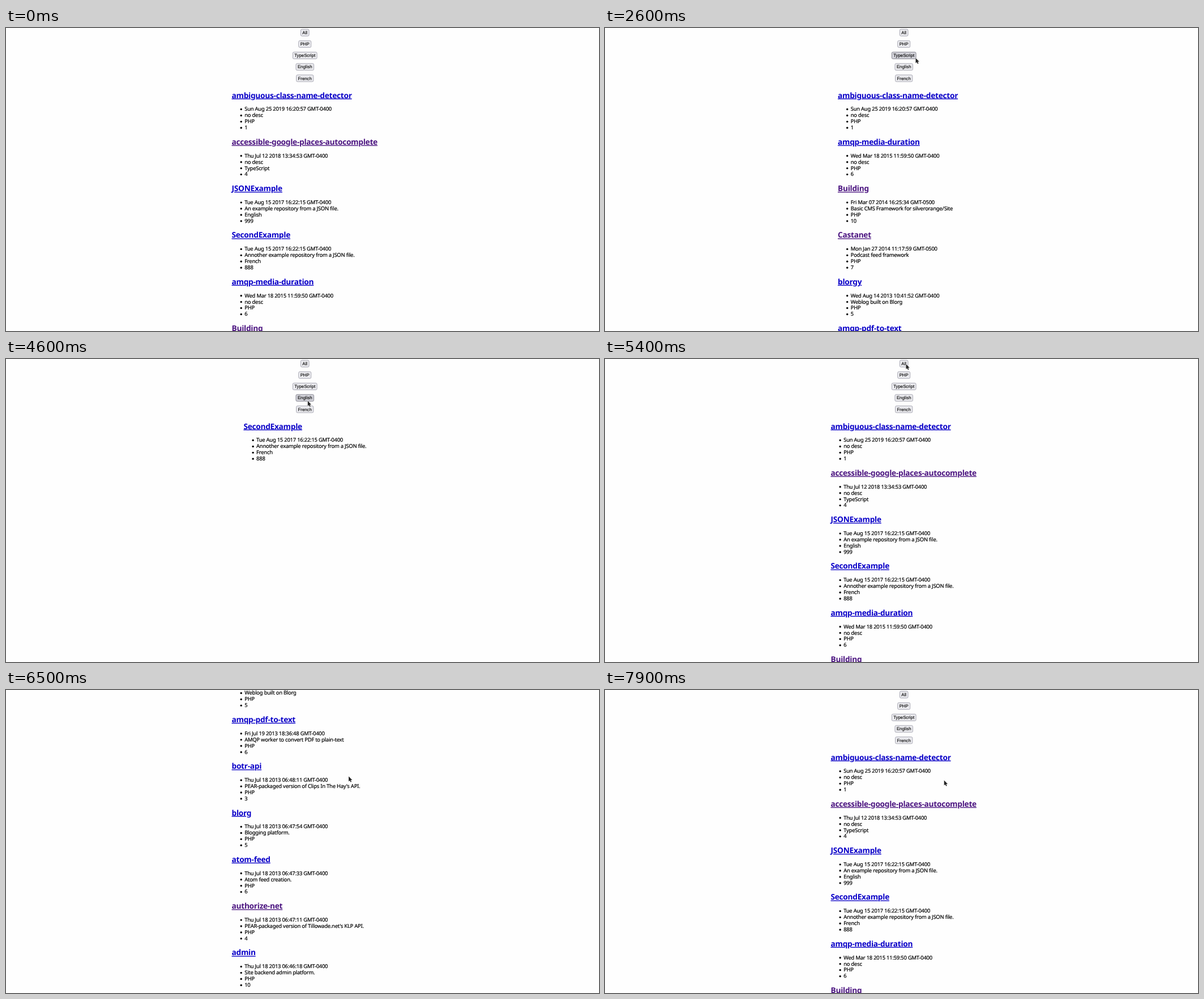
An HTML page for the animation above (8 s loop, 1047x535 px).

```html
<!DOCTYPE html>
<html lang="en">
<head>
<meta charset="utf-8">
<title>Repository list</title>
<style>
  html, body { margin: 0; width: 100%; height: 100%; overflow: hidden; background: #fefefe; }
  svg { display: block; width: 1047px; height: 535px; }
  text { text-rendering: geometricPrecision; }
  .repo text {
    font: 9.35px "Noto Sans", "Open Sans", sans-serif; letter-spacing: -.02em;
    fill: #000; stroke: #000; stroke-width: .2;
  }
  .repo .title {
    font-size: 13.7px; font-weight: 700; fill: #0a00c8; stroke: none;
    text-decoration: underline; text-decoration-thickness: 1px; text-decoration-skip-ink: none;
  }
  .repo .visited { fill: #4b1480; }
  .button rect { fill: #e9e9ed; stroke: #8f8f9d; stroke-width: .7; }
  .button.hover rect { fill: #d0d0d7; stroke: #676774; }
  .button text {
    font: 7.8px "Liberation Sans", Arial, sans-serif; text-anchor: middle;
    fill: #000; stroke: #000; stroke-width: .1;
  }
  #cursor { fill: #222; stroke: #fff; stroke-width: .8; paint-order: stroke; }
</style>
</head>
<body>
<svg viewBox="0 0 1047 535">
  <g id="page"></g>
  <path id="cursor" d="M0 0V9L2 7.2L3.5 10.3L5 9.6L3.6 6.6H6.3Z"/>
</svg>
<script>
const LOOP = 8000, STEP = 100;
const CENTER = 527.7, ROW = 82.3, LINE = 10.93;
const page = document.getElementById('page');
const cursor = document.getElementById('cursor');

// title, date, description, language, count, visited
const repos = [
  ['ambiguous-class-name-detector', 'Sun Aug 25 2019 16:20:57 GMT-0400', 'no desc', 'PHP', 1],
  ['accessible-google-places-autocomplete', 'Thu Jul 12 2018 13:34:53 GMT-0400', 'no desc', 'TypeScript', 4, true],
  ['JSONExample', 'Tue Aug 15 2017 16:22:15 GMT-0400', 'An example repository from a JSON file.', 'English', 999],
  ['SecondExample', 'Tue Aug 15 2017 16:22:15 GMT-0400', 'Annother example repository from a JSON file.', 'French', 888],
  ['amqp-media-duration', 'Wed Mar 18 2015 11:59:50 GMT-0400', 'no desc', 'PHP', 6],
  ['Building', 'Fri Mar 07 2014 16:25:34 GMT-0500', 'Basic CMS Framework for silverorange/Site', 'PHP', 10, true],
  ['Castanet', 'Mon Jan 27 2014 11:17:59 GMT-0500', 'Podcast feed framework', 'PHP', 7, true],
  ['blorgy', 'Wed Aug 14 2013 10:41:52 GMT-0400', 'Weblog built on Blorg', 'PHP', 5],
  ['amqp-pdf-to-text', 'Fri Jul 19 2013 18:36:48 GMT-0400', 'AMQP worker to convert PDF to plain-text', 'PHP', 6],
  ['botr-api', 'Thu Jul 18 2013 06:48:11 GMT-0400', "PEAR-packaged version of Clips In The Hay's API.", 'PHP', 3],
  ['blorg', 'Thu Jul 18 2013 06:47:54 GMT-0400', 'Blogging platform.', 'PHP', 5],
  ['atom-feed', 'Thu Jul 18 2013 06:47:33 GMT-0400', 'Atom feed creation.', 'PHP', 6],
  ['authorize-net', 'Thu Jul 18 2013 06:47:11 GMT-0400', "PEAR-packaged version of Tillowade.net's KLP API.", 'PHP', 4, true],
  ['admin', 'Thu Jul 18 2013 06:46:18 GMT-0400', 'Site backend admin platform.', 'PHP', 10]
];

// Left edge of the centred list under each filter
const listLeft = { All: 398.5, PHP: 411, TypeScript: 398.5, English: 433.2, French: 419.4 };

const clicks = [
  { at: 0, label: 'All' }, { at: 1000, label: 'PHP' }, { at: 2800, label: 'TypeScript' },
  { at: 3600, label: 'English' }, { at: 4500, label: 'French' }, { at: 5400, label: 'All' }
];

// Motions: start, end, destination
const POINTER_SHOWN = 500, POINTER_START = [541, 7];
const pointerMoves = [
  [500, 800, 532, 27], [1000, 1200, 628, 146], [2100, 2600, 548.5, 53],
  [3000, 3300, 536, 68], [3600, 3900, 536, 82.5], [4000, 4200, 533, 87],
  [4500, 5100, 531.5, 9], [5400, 5800, 605, 152.5], [7800, 7900, 598.7, 159.5]
];
const scrollMoves = [
  [1163, 1500, 478], [1800, 2000, 0],
  [5800, 6000, 380], [6200, 6300, 560], [6400, 6500, 725],
  [6700, 7000, 200], [7300, 7500, 48], [7600, 7700, 0]
];

function follow(moves, origin, t) {
  let place = origin;
  for (const [start, end, ...goal] of moves) {
    if (t <= start) break;
    const k = Math.min(1, (t - start) / (end - start));
    place = place.map((value, i) => value + (goal[i] - value) * k);
  }
  return place;
}

const pointerAt = t => follow(pointerMoves, POINTER_START, t);

function add(parent, tag, attrs, content) {
  const node = document.createElementNS('http://www.w3.org/2000/svg', tag);
  for (const name in attrs) node.setAttribute(name, attrs[name]);
  if (content !== undefined) node.textContent = content;
  return parent.appendChild(node);
}

const buttons = Object.keys(listLeft).map((label, i) => {
  const y = 8.2 + 20.15 * i;
  const group = add(page, 'g', { class: 'button' });
  const box = add(group, 'rect', { y: y - 6, height: 12, rx: 2.2 });
  const width = add(group, 'text', { x: CENTER, y: y + 2.8 }, label).getComputedTextLength() + 6;
  box.setAttribute('x', CENTER - width / 2);
  box.setAttribute('width', width);
  const contains = (px, py) => Math.abs(px - CENTER) < width / 2 && Math.abs(py - y) < 6;
  return { group, contains };
});

const items = repos.map(([title, date, description, language, count, visited]) => {
  const group = add(page, 'g', { class: 'repo' });
  add(group, 'text', { class: visited ? 'title visited' : 'title', y: 123.5 }, title);
  [date, description, language, count].forEach((line, i) => {
    const y = 146.4 + LINE * i;
    add(group, 'circle', { cx: 16.7, cy: y - 2.9, r: 1.7 });
    add(group, 'text', { x: 22.7, y }, line);
  });
  return { group, language };
});

function render(t) {
  const { at, label } = clicks.filter(click => click.at <= t).pop();
  let row = 0;
  for (const { group, language } of items) {
    const shown = label === 'All' || label === language;
    group.style.display = shown ? '' : 'none';
    if (shown) group.setAttribute('transform', `translate(${listLeft[label]} ${ROW * row++})`);
  }

  const [scroll] = follow(scrollMoves, [0], t);
  page.setAttribute('transform', `translate(0 ${-scroll})`);

  // A click redraws the buttons, so hover returns only once the pointer moves
  const [x, y] = pointerAt(t);
  const moved = String(pointerAt(at)) !== String([x, y]);
  for (const { group, contains } of buttons) {
    group.classList.toggle('hover', moved && contains(x, y + scroll));
  }
  cursor.style.display = t < POINTER_SHOWN ? 'none' : '';
  cursor.setAttribute('transform', `translate(${x} ${y})`);
}

const start = performance.now();
let lastTime = -1;
function tick() {
  const elapsed = (performance.now() - start) % LOOP;
  const time = Math.floor(elapsed / STEP) * STEP;
  if (time !== lastTime) render(lastTime = time);
  requestAnimationFrame(tick);
}
tick();
</script>
</body>
</html>
```
